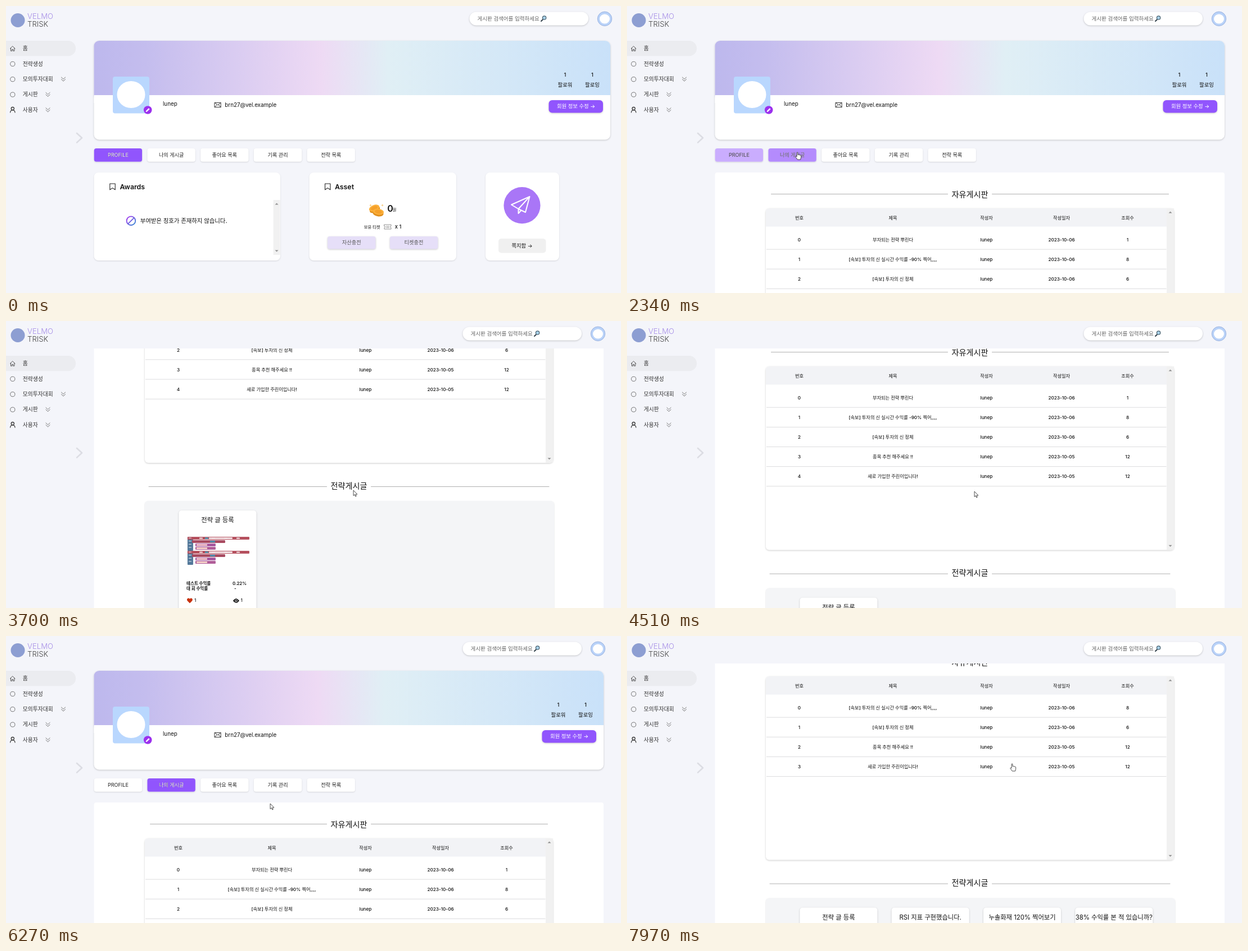
An HTML page for the animation above (8 s loop, 1094x512 px).

```html
<!DOCTYPE html>
<html lang="ko">
<head>
<meta charset="utf-8">
<title>Profile page</title>
<style>
html, body { margin: 0; width: 100%; height: 100%; overflow: hidden; background: #f4f5fa; }
svg { display: block; width: 1094px; height: 512px; }
text { font-family: Inter, "Noto Sans CJK KR", "Noto Sans CJK", sans-serif; white-space: pre; }
.soft { filter: drop-shadow(0 1px 1px rgba(0,0,0,.13)); }
.lift { filter: drop-shadow(0 1.5px 1.5px rgba(0,0,0,.2)); }

.scroll, .cursor, .shift, .grow, .home, .mine, .likes, .arrow, .hand, .on {
  animation: 8s linear infinite both;
}
.scroll { animation-name: scroll; }
.cursor { animation-name: cursor; }
.shift, .grow, .home, .mine, .likes, .arrow, .hand { animation-timing-function: step-end; }
.shift { animation-name: shift; }
.grow { animation-name: grow; }
.home { animation-name: home; }
.mine { animation-name: mine; }
.likes { animation-name: likes; }
.arrow { animation-name: arrow; }
.hand { animation-name: hand; }
.on0 { animation-name: on0; }
.on1 { animation-name: on1; }
.on2 { animation-name: on2; }

@keyframes scroll {
  0%, 37.5% { transform: translateY(0); animation-timing-function: cubic-bezier(.35,.1,.6,1); }
  46.25%, 48.25% { transform: translateY(-435.5px); animation-timing-function: ease-in-out; }
  52%, 55% { transform: translateY(-305px); animation-timing-function: ease-in-out; }
  58.125%, 64.25% { transform: translateY(-243px); animation-timing-function: ease-in-out; }
  68.375%, 72.2% { transform: translateY(-201px); animation-timing-function: ease-in-out; }
  76%, 92.875% { transform: translateY(0); animation-timing-function: ease-in; }
  94.625%, 95.25% { transform: translateY(-39.5px); animation-timing-function: ease-out; }
  99.5%, 100% { transform: translateY(-289px); }
}
@keyframes cursor {
  0%, 5.5% { transform: translate(990px,520px); animation-timing-function: ease-out; }
  15.75%, 16.25% { transform: translate(404px,302px); animation-timing-function: ease-in-out; }
  22.5% { transform: translate(277px,255px); animation-timing-function: ease-in-out; }
  25.9%, 31% { transform: translate(303px,261px); animation-timing-function: ease-in-out; }
  37%, 48.6% { transform: translate(618px,302px); }
  52%, 75% { transform: translate(618px,304px); animation-timing-function: ease-in-out; }
  78.375%, 79.125% { transform: translate(470px,299px); animation-timing-function: ease-out; }
  81.75%, 86% { transform: translate(389px,264px); animation-timing-function: ease-in-out; }
  92.6%, 95.5% { transform: translate(686px,209px); }
  99%, 100% { transform: translate(685px,228px); }
}
@keyframes shift {
  0%, 83.5% { transform: translateX(12px); }
  28%, 84.375%, 100% { transform: none; }
}
@keyframes grow {
  0%, 83.5% { width: 918.5px; }
  28%, 84.375%, 100% { width: 906.5px; }
}
@keyframes home { 0% { visibility: visible; } 28%, 100% { visibility: hidden; } }
@keyframes mine { 0%, 83.5%, 100% { visibility: hidden; } 28% { visibility: visible; } }
@keyframes likes { 0% { visibility: hidden; } 84.375%, 100% { visibility: visible; } }
@keyframes hand {
  0%, 32%, 86.8% { visibility: hidden; }
  21%, 80.5%, 97.2%, 100% { visibility: visible; }
}
@keyframes arrow {
  0%, 32%, 86.8% { visibility: visible; }
  21%, 80.5%, 97.2%, 100% { visibility: hidden; }
}
@keyframes on0 {
  0%, 27.5% { opacity: 1; }
  29.25%, 30.125% { opacity: .48; }
  31.5%, 100% { opacity: 0; }
}
@keyframes on1 {
  0%, 27.5% { opacity: 0; }
  29.25%, 30.125% { opacity: .68; }
  31.5%, 83% { opacity: 1; }
  86.5%, 100% { opacity: 0; }
}
@keyframes on2 {
  0%, 83% { opacity: 0; }
  86.5%, 100% { opacity: 1; }
}
</style>
</head>
<body>
<svg id="stage" viewBox="0 0 1094 512"></svg>
<script>
const PURPLE = '#9155fd';

const rect = (x, y, w, h, fill, r = 0, cls = '') =>
  `<rect x="${x}" y="${y}" width="${w}" height="${h}" rx="${r}" fill="${fill}" class="${cls}"/>`;
const line = (d, color, w = 1) =>
  `<path d="${d}" fill="none" stroke="${color}" stroke-width="${w}" stroke-linejoin="round" stroke-linecap="round"/>`;
const shape = (d, fill) => `<path d="${d}" fill="${fill}"/>`;
const disc = (x, y, r, fill, extra = '') => `<circle cx="${x}" cy="${y}" r="${r}" fill="${fill}" ${extra}/>`;
const group = (cls, ...parts) => `<g class="${cls}">${parts.join('')}</g>`;
// y is the middle of the line
const label = (x, y, size, str, { color = '#111', weight = 400, at = 'start' } = {}) =>
  `<text x="${x}" y="${y + size * .36}" font-size="${size}" fill="${color}" font-weight="${weight}" text-anchor="${at}">${str}</text>`;
const mid = (x, y, size, str, opt) => label(x, y, size, str, { at: 'middle', ...opt });
const tri = (x, y, dir) => shape(`M${x - 3} ${y + 1.5 * dir}h6l-3 ${-3 * dir}z`, '#8f8f8f');

const defs = `<defs>
  <linearGradient id="sky">
    <stop offset="0" stop-color="#bdb8ed"/><stop offset=".1" stop-color="#c4bdee"/>
    <stop offset=".44" stop-color="#eedaf4"/><stop offset=".57" stop-color="#e0eff5"/>
    <stop offset="1" stop-color="#c9e1f9"/>
  </linearGradient>
  <linearGradient id="ban" x2="1" y2="1"><stop stop-color="#a72bf0"/><stop offset="1" stop-color="#2d8bd0"/></linearGradient>
</defs>`;

function header() {
  const glass = line('M942.8 24.2L940 27', '#34434d', 2) +
    disc(945.6, 21, 3.2, '#a9d2ea', 'stroke="#48606e" stroke-width="1.2"');
  const face = disc(1053, 22.8, 12.7, '#b9d2f8', 'stroke="#8fa8d8" stroke-width=".8"') +
    '<ellipse cx="1053" cy="23" rx="9" ry="8.6" fill="#fff"/>';
  return rect(0, 0, 1094, 49, '#f4f5fa') +
    disc(21, 25.5, 12.5, '#8d9ed2') +
    label(38, 18.5, 13.2, 'VELMO', { color: '#a48be6', weight: 300 }) +
    label(38, 32, 13.2, 'TRISK', { color: '#444', weight: 300 }) +
    group('shift', rect(812.5, 10.5, 211.5, 24, '#fff', 12, 'lift'),
      label(826.5, 22.5, 9.5, '게시판 검색어를 입력하세요', { color: '#666' }), glass, face);
}

function sidebar() {
  const names = ['홈', '전략생성', '모의투자대회', '게시판', '사용자'];
  let out = shape('M0 62H110.5a13.6 13.6 0 0 1 0 27.3H0z', '#ebecf0');
  names.forEach((n, i) => {
    const y = 76 + i * 27.35;
    out += label(29.7, y - .2, 9.8, n, { color: '#333' });
    if (i > 0 && i < 4) out += disc(11.8, y, 4.1, 'none', 'stroke="#666" stroke-width=".9"');
    if (i > 1) {
      const x = i == 2 ? 98.4 : 70.9;
      out += line(`M${x} ${y - 3.6}l3.6 3.4 3.6-3.4M${x} ${y}l3.6 3.4 3.6-3.4`, '#666', .9);
    }
  });
  return out +
    line('M7.3 76l4.4-4.3 4.4 4.3M8.5 75.2v5h2.2v-2.8h2v2.8h2.2v-5', '#444', .9) +
    disc(11.8, 183, 2.6, 'none', 'stroke="#222" stroke-width="1.1"') +
    line('M7.6 190c.2-5.6 8.2-5.6 8.4 0', '#222', 1.1) +
    line('M126 227l9 8.3-9 8.3', '#dcdde3', 2.6);
}

function profile() {
  const stat = (x, n) => mid(x, 123, 9.4, 1, { weight: 500 }) + mid(x, 141, 9.4, n, { weight: 500 });
  return rect(156.5, 62, 906.5, 176.5, '#fff', 9, 'grow lift') +
    rect(156.5, 62, 906.5, 108, 'url(#sky)', 9, 'grow') +
    rect(156.5, 159, 906.5, 14, '#fff', 0, 'grow') +
    rect(190, 126, 65, 65.5, '#b9d7fe', 4) +
    '<ellipse cx="222.5" cy="158" rx="25" ry="24" fill="#fff"/>' +
    disc(252.2, 185.5, 7.3, '#9b30ee') +
    shape('M248.6 189.2l.6-2.4 4.6-4.6 1.8 1.8-4.6 4.6z', '#fff') +
    label(279, 174.5, 9.8, 'lunep') +
    line('M371.3 172.5h10.8v8h-10.8zl5.4 4.3 5.4-4.3M371.3 180.5l3.8-4.2M382.1 180.5l-3.8-4.2', '#222', .9) +
    label(389.3, 176, 9.8, 'brn27@vel.example') +
    group('shift', stat(982.5, '팔로워'), stat(1031, '팔로잉'),
      rect(953.5, 168, 96.5, 22.5, PURPLE, 6, 'lift'),
      mid(1002, 179, 9.4, '회원 정보 수정 →', { color: '#fff', weight: 500 }));
}

function tabs() {
  return ['PROFILE', '나의 게시글', '좋아요 목록', '기록 관리', '전략 목록'].map((n, i) => {
    const x = 156.7 + i * 94.7;
    const box = fill => rect(x, 254, 85.4, 23.7, fill, 4);
    const name = color => mid(x + 42.7, 265.8, 9.1, n, { color });
    const on = 'on on' + i, fades = i < 3;
    // the label turns white later than the box turns purple
    return group('soft', box('#fff'), fades ? group(on, box(PURPLE)) : '') + name('#222') +
      (fades ? group(on, group(on, name('#fff'))) : '');
  }).join('');
}

function home() {
  const mark = x => line(`M${x} 317h9.4v10.8l-4.7-3.2-4.7 3.2z`, '#222', 1.1);
  const button = (x, n) => rect(x, 411, 85.5, 22.5, '#e6dff8', 4, 'lift') +
    mid(x + 42.7, 422, 9.2, n, { color: '#555' });
  const coin = (x, y, a) => `<g transform="translate(${x} ${y}) rotate(${a})">
    <ellipse cy="3" rx="9.6" ry="5.4" fill="#e08f1e"/><ellipse rx="9.6" ry="5.4" fill="#fbb03b"/>
    <ellipse rx="6.4" ry="3.3" fill="#f5a02a"/></g>`;
  return rect(156.5, 297, 331.5, 157, '#fff', 8, 'soft') +
    mark(184.8) + label(202.5, 322.5, 12.3, 'Awards', { weight: 600 }) +
    disc(222.4, 383.2, 7.8, 'none', 'stroke="url(#ban)" stroke-width="1.8"') +
    line('M217 388.6l10.8-10.8', '#6a5be0', 1.7) +
    label(238.7, 383.3, 10.4, '부여받은 칭호가 존재하지 않습니다.', { weight: 500 }) +
    rect(475.5, 346, 12, 98, '#f1f1f1') + tri(481.5, 353, 1) + tri(481.5, 437, -1) +
    rect(539.5, 297, 261.5, 157, '#fff', 8, 'soft') +
    mark(567.5) + label(585, 322.5, 12.3, 'Asset', { weight: 600 }) +
    coin(655, 360.5, -22) + coin(662.5, 367, 8) +
    line('M648.5 354v3M647 355.5h3M669.5 354v3M668 355.5h3', '#f6c063', .8) +
    label(678.3, 361, 16, '0', { weight: 600 }) + label(687.7, 363.5, 7.2, '원') +
    label(636.7, 394, 7.3, '보유 티켓', { weight: 500 }) +
    line('M673 390h12v2.5a1.5 1.5 0 0 0 0 3v2.5h-12v-2.5a1.5 1.5 0 0 0 0-3zM676.5 393h5M676.5 395.3h5', '#777', .8) +
    label(691.7, 393.5, 9.4, 'x 1', { weight: 500 }) +
    button(572, '자산충전') + button(682.8, '티켓충전') +
    rect(853, 297, 131, 157, '#fff', 8, 'soft') +
    disc(918, 355.7, 32.6, '#a976f7') +
    line('M899 354.5L931.5 340l-7.5 28-12.5-6zM911.5 362L931.5 340M911.5 362v8l5-5.4', '#fff', 2) +
    rect(876, 415, 84.5, 25.5, '#f0f0f0', 5) + mid(918, 427.7, 9.3, '쪽지함 →');
}

// small picture of stacked code blocks
function blocks(x, y) {
  let out = '';
  for (const k of [0, 25]) {
    const b = y + k;
    out += rect(x, b, 10, 25, '#53789a', 1) + rect(x, b, 110, 5, '#b5505e', 1) +
      rect(x + 38, b + 1, 42, 3, '#f3e3e6', 1) + rect(x + 8, b + 6, 59, 5, '#a94c62', 1) +
      rect(x + 31, b + 1, 6, 3, '#5b9cb4') + rect(x + 40, b + 7, 9, 3, '#4f90b0') +
      rect(x + 14, b + 12, 36, 5, '#a6569e', 1) + rect(x + 14, b + 18, 36, 5, '#b05d98', 1) +
      rect(x + 16, b + 13, 19, 3, '#f5c8cb') + rect(x + 16, b + 19, 19, 3, '#f5d0c8');
    for (let i = 0; i < 4; i++) out += rect(x + 21 + i * 22, b + 1.4, 6, 2.2, '#f7eeee', .6);
    for (let i = 0; i < 4; i++) out += rect(x + 2, b + 1.6 + i * 5.6, 5, 1, '#dfe8f0');
  }
  return out;
}

function card(x, name) {
  const bold = { weight: 700 };
  return rect(x, 773.5, 138, 185, '#fff', 5, 'lift') + mid(x + 69, 790.5, 11.3, name) +
    blocks(x + 15.5, 820.5) +
    label(x + 13.7, 903.5, 7.5, '테스트 수익률', bold) + label(x + 13.7, 913, 7.5, '대 회 수익률', bold) +
    label(x + 95.7, 903.5, 7.8, '0.22%', { weight: 600 }) + label(x + 98.5, 913, 7.8, '-', bold) +
    shape(`M${x + 19.5} 939l-4.2-4.3c-2.5-3 1.7-6.6 4.2-3.4 2.5-3.2 6.7.4 4.2 3.4z`, '#c8320f') +
    label(x + 27.5, 933.5, 7.8, 1, { weight: 500 }) +
    shape(`M${x + 96.5} 934.5q5.5-7.6 11 0q-5.5 7.6-11 0z`, '#111') +
    disc(x + 102, 934.5, 2.3, '#fff') + disc(x + 102, 934.5, 1.4, '#111') +
    label(x + 110, 933.5, 7.8, 1, { weight: 500 });
}

const cols = [306.5, 473, 639.5, 773, 890.5];
const cells = (y, list) => list.map((v, i) => mid(cols[i], y, 8.2, v, { weight: 500 })).join('');

function board(posts, cards) {
  let out = rect(156.5, 297, 906.5, 760, '#fff', 4) +
    mid(610, 336.3, 14.1, '자유게시판') + line('M256.5 335.5H570.5M649.5 335.5H963.5', '#b0b0b0') +
    rect(247, 361, 726, 327.5, '#fff', 6, 'lift') +
    shape('M247 393.5V367a6 6 0 0 1 6-6H960v32.5z', '#f2f3f6') +
    rect(960, 361, 13, 327, '#f1f1f1') + tri(966.5, 368, 1) + tri(966.5, 681.3, -1) +
    cells(377.7, ['번호', '제목', '작성자', '작성일자', '조회수']);
  posts.forEach(([name, day, views], i) => {
    const y = 416.8 + i * 35.15;
    out += cells(y, [i, name, 'lunep', '2023-10-0' + day, views]) +
      rect(248, y + 16.8, 711.5, 1, '#dcdcde');
  });
  out += mid(610, 729, 14.1, '전략게시글') + line('M254 731H570.5M649.5 731H966', '#b0b0b0') +
    rect(247, 756.5, 728, 230, '#f4f5f7', 6, 'soft');
  cards.forEach((n, i) => out += card(307.4 + i * 163.3, n));
  return out;
}

const posts = [
  ['부자되는 전략 뿌린다', 6, 1],
  ['[속보] 투자의 신 실시간 수익률 -90% 찍어,,,,', 6, 8],
  ['[속보] 투자의 신 정체', 6, 6],
  ['종목 추천 해주세요 !!', 5, 12],
  ['새로 가입한 주린이입니다!', 5, 12]
];
const cards = ['전략 글 등록', 'RSI 지표 구현했습니다.', '누솔화재 120% 찍어보기', '38% 수익률 본 적 있습니까?'];

const ink = 'fill="#fff" stroke="#222" stroke-width=".8" stroke-linejoin="round"';
const arrow = `<path d="M0 0V9.6L2.2 7.6 3.7 11 5.2 10.3 3.8 7.1H6.8z" ${ink}/>`;
const hand = `<path d="M-.9 .9C-.9-.5 1-.5 1 .9V4.6C1.2 3.8 2.9 3.9 3 5 3.5 4.2 5 4.5 5 5.5 5.6 5 6.6 5.3 6.6 6.4V9.3L5.6 13H.3L-2.9 8.6C-3.8 7.2-2.4 6.4-.9 8z" ${ink}/>`;

document.getElementById('stage').innerHTML = defs + rect(0, 0, 1094, 512, '#f4f5fa') +
  group('scroll', profile(), tabs(), group('home', home()),
    group('mine', board(posts, cards.slice(0, 1))),
    group('likes', board(posts.slice(1), cards))) +
  sidebar() + header() +
  group('cursor', group('arrow', arrow), group('hand', hand));
</script>
</body>
</html>
```
